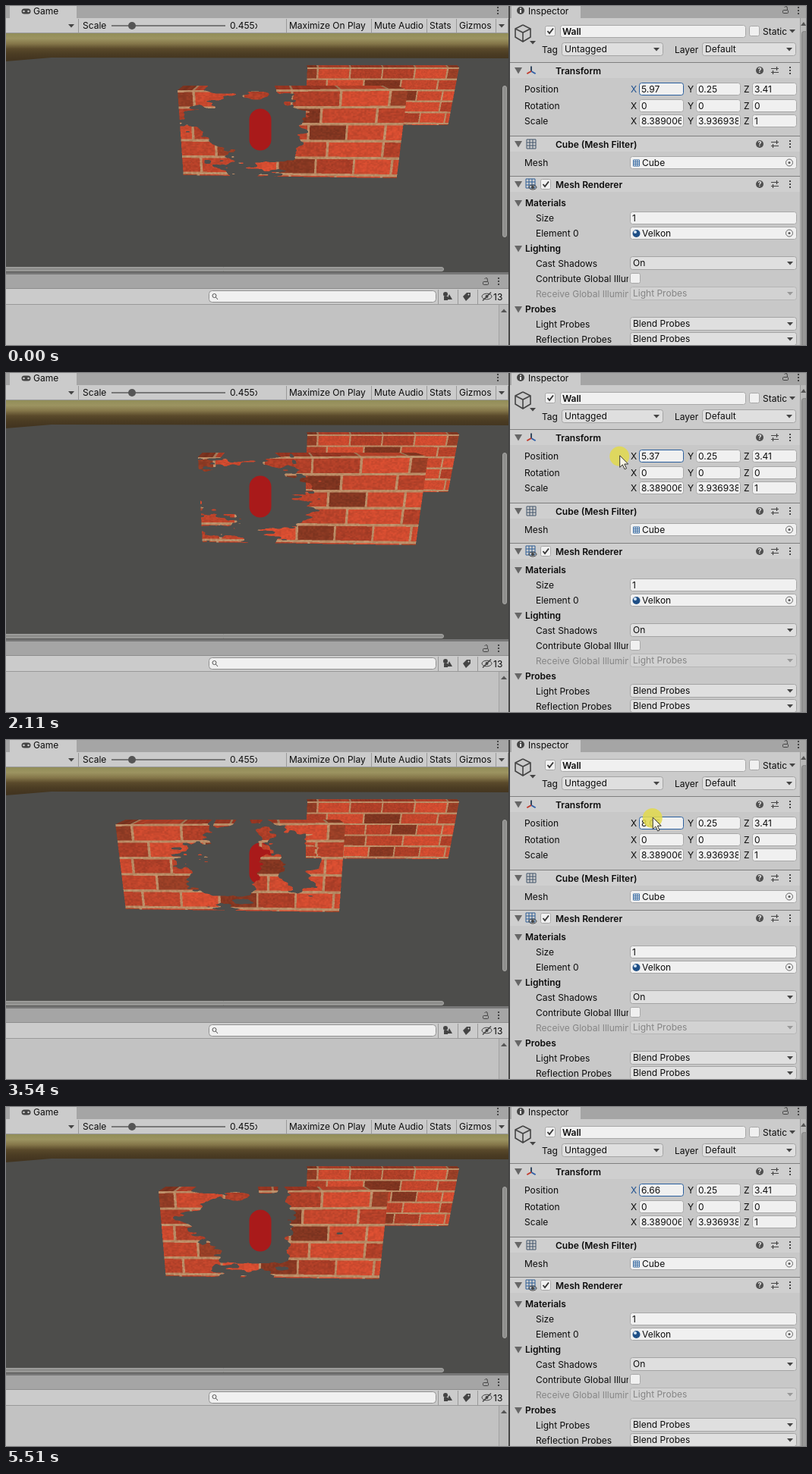
Animation, 1054 px wide and 447 px high, one loop 6050 ms. Source, as an HTML page with a canvas:

```html
<!DOCTYPE html>
<html lang="en">
<head>
<meta charset="utf-8">
<title>Wall cutout</title>
<style>
html, body { margin: 0; width: 100%; height: 100%; overflow: hidden; background: #c8c8c8; }
canvas { display: block; width: 1054px; height: 447px; }
</style>
</head>
<body>
<canvas id="stage" width="1054" height="447"></canvas>
<script>
const LOOP = 6050, START = 1630, STEP = 79.2;
const g = document.getElementById('stage').getContext('2d');
const FONT = 'Inter, Roboto, sans-serif';
const INK = '#0c0c0c', ICON = '#444';

const PRESS = 0, RELEASE = 41, GONE = 49;
const part = (n, a, b) => Math.min(1, Math.max(0, (n - a) / (b - a)));
const smooth = f => f * f * (3 - 2 * f);
const easeOut = f => 1 - (1 - f) ** 3;
const bezier = (f, a, b, c) => (1 - f) ** 2 * a + 2 * f * (1 - f) * b + f * f * c;

// Right, far left, then a quick release back to the middle
function wallX(n) {
  return 226 + 32 * smooth(part(n, 0, 8)) - 127 * smooth(part(n, 8, 28)) + 70 * easeOut(part(n, 31, 38));
}
function pointerAt(n) {
  if (n <= -11) {
    const f = part(n, -19, -13);
    return [bezier(f, 1002, 520, 781), bezier(f, 422, 120, 115)];
  }
  if (n <= PRESS) return [781 + 57 * part(n, -11, -7) - 16 * part(n, -5, -3), 115 - 5 * part(n, -11, -7)];
  if (n < RELEASE) return [829 + (201 - wallX(n)) * .4, 110 - 7 * smooth(part(n, 5, 17))];
  const f = part(n, 40, 48);
  return [bezier(f, 829, 1125, 989), bezier(f, 103, 180, 438)];
}

// ---- noise and brick texture ----
function hash(i, j) {
  let h = Math.imul(i, 374761393) + Math.imul(j, 668265263) | 0;
  h = Math.imul(h ^ (h >>> 13), 1274126177);
  return ((h ^ (h >>> 16)) >>> 0) / 4294967296;
}
function noise(x, y) {
  const i = Math.floor(x), j = Math.floor(y);
  const a = smooth(x - i), b = smooth(y - j);
  const top = hash(i, j) * (1 - a) + hash(i + 1, j) * a;
  const low = hash(i, j + 1) * (1 - a) + hash(i + 1, j + 1) * a;
  return top * (1 - b) + low * b;
}

const TW = 610, TH = 240, SPAN = 303, RISE = 116;
const COURSE = .192, FIRST = [21, 41, 17, 48, 26], PITCH = [65, 75, 52.5, 77, 53.6];
const tex = new Uint8ClampedArray(TW * TH * 3);
const field = new Float32Array(TW * TH);

function brick(p, v) {
  const row = (v - .205) / COURSE + 1, r = Math.floor(row), kind = r % 5;
  const col = (p - FIRST[kind]) / PITCH[kind] + 1, i = Math.floor(col);
  const edge = Math.abs(row - Math.round(row)) * COURSE * RISE;
  const side = Math.abs(col - Math.round(col)) * PITCH[kind];
  const grain = noise(p / 2.5, v * RISE / 1.8) - .5;
  if (edge < 1.6 || side < 1.7) return [186, 140, 102].map(c => c + grain * 24);
  const base = (i + 3 * r) % 5 ? [202, 73, 46] : [148, 61, 37];
  const tone = .84 + .22 * hash(i + 7, r + 3) + grain * .16;
  return base.map(c => c * tone);
}

// How strongly a place on the wall withstands the cutout
const clump = (p, v, cp, cv, wp, wv) => Math.exp(-(((p - cp) / wp) ** 2) - ((v - cv) / wv) ** 2);
function resist(p, v) {
  const q = v * RISE;
  const rough = noise(p / 24, q / 8) * .6 + noise(p / 9 + 50, q / 3) * .4 - .5;
  return rough * .8
    + 1.1 * clump(p, v, 203, .6, 23, .38)
    + .5 * clump(p, v, 45, .7, 32, .14)
    + .5 * clump(p, v, 106, .09, 15, .08)
    - .4 * clump(p, v, 241, .5, 18, .2)
    + .4 * clump(p, v, 165, .85, 80, .022);
}
for (let j = 0; j < TH; j++) for (let i = 0; i < TW; i++) {
  const p = (i + .5) / TW * SPAN, v = (j + .5) / TH, n = j * TW + i;
  tex.set(brick(p, v), n * 3);
  field[n] = resist(p, v);
}

// ---- walls ----
const VX = 335;
function drawWall(o) {
  const x0 = Math.floor(o.x) - 2, y0 = o.top - 1, w = o.w + 8, h = o.bl + 6 - y0;
  const c = document.createElement('canvas');
  c.width = w; c.height = h;
  const cx = c.getContext('2d'), img = cx.createImageData(w, h), d = img.data;
  for (let j = 0; j < h; j++) for (let i = 0; i < w; i++) {
    let r = 0, gr = 0, b = 0, n = 0;
    for (let s = 0; s < 4; s++) {
      const x = x0 + i + .25 + (s & 1) * .5, y = y0 + j + .25 + (s >> 1) * .5;
      if (y < o.top) continue;
      const rise = (y - o.tl) / (o.bl - o.tl);
      const k = rise < 0 ? 1 - o.kt * (o.tl - y) / (o.tl - o.top) : 1 - o.k * rise;
      const u = (VX + (x - VX) / k - o.x) / o.w;
      if (u < 0 || u >= 1) continue;
      const yt = o.tl + u * (o.tr - o.tl), yb = o.bl + u * (o.br - o.bl);
      const v = (y - yt) / (yb - yt);
      if (v >= 1) continue;
      const col = Math.floor(u * TW);
      if (o.cut) {
        const f = field[Math.floor(Math.max(v, 0) * TH) * TW + col];
        if (Math.hypot((x - 320) / 80, (y - 163) / 59) + f < 1) continue;
      }
      const lit = v < 0 ? .84 : 1;
      const m = (Math.floor((v < 0 ? .1 : v) * TH) * TW + col) * 3;
      r += tex[m] * lit; gr += tex[m + 1] * lit; b += tex[m + 2] * lit; n++;
    }
    if (n) {
      const m = (j * w + i) * 4;
      d[m] = r / n; d[m + 1] = gr / n; d[m + 2] = b / n; d[m + 3] = n * 63.75;
    }
  }
  cx.putImageData(img, 0, 0);
  return { c, x: x0, y: y0 };
}
const backWall = drawWall({ x: 397, w: 200, tl: 81, tr: 81, bl: 156, br: 157, top: 78, k: .055, kt: .01 });
let front = null, frontX = -1;
function frontWall(x) {
  if (x !== frontX) {
    front = drawWall({ x, w: SPAN, tl: 111, tr: 109, bl: 223, br: 227, top: 105, k: .071, kt: .07, cut: true });
    frontX = x;
  }
  return front;
}

// ---- small drawing helpers ----
function rect(x, y, w, h, fill) { g.fillStyle = fill; g.fillRect(x, y, w, h); }
function box(x, y, w, h, fill, line, r = 3) {
  g.beginPath();
  g.roundRect(x + .5, y + .5, w - 1, h - 1, r);
  g.fillStyle = fill; g.fill();
  if (line) { g.strokeStyle = line; g.lineWidth = 1; g.stroke(); }
}
function text(s, x, y, o = {}) {
  g.save();
  if (o.clip) { g.beginPath(); g.rect(x - 2, y - 14, o.clip - x + 2, 20); g.clip(); }
  g.font = (o.bold ? '600 ' : '') + '12px ' + FONT;
  g.fillStyle = o.fill || INK;
  g.fillText(s, x, y);
  g.restore();
}
function shape(pts, fill) {
  g.beginPath();
  for (let i = 0; i < pts.length; i += 2) g.lineTo(pts[i], pts[i + 1]);
  g.closePath();
  g.fillStyle = fill; g.fill();
}
function lines(color, width, ...paths) {
  g.strokeStyle = color; g.lineWidth = width;
  g.beginPath();
  for (const p of paths) {
    g.moveTo(p[0], p[1]);
    for (let i = 2; i < p.length; i += 2) g.lineTo(p[i], p[i + 1]);
  }
  g.stroke();
}
function disc(x, y, r, fill) { g.beginPath(); g.arc(x, y, r, 0, 7); g.fillStyle = fill; g.fill(); }
function ring(x, y, rx, ry, color) {
  g.beginPath(); g.ellipse(x, y, rx, ry, 0, 0, 7);
  g.strokeStyle = color; g.lineWidth = 1; g.stroke();
}
function down(x, y, fill = ICON) { shape([x - 4, y - 2, x + 4, y - 2, x, y + 2.5], fill); }
function dots(x, y) { for (const k of [-4, 0, 4]) rect(x - 1, y + k - 1, 2, 2, ICON); }
function lock(x, y) {
  box(x - 4, y, 8, 5, '#a5a5a5', ICON, 1);
  lines(ICON, 1, [x - 1.5, y - 3, x, y - 4.5, x + 2, y - 4, x + 2.5, y]);
}
function check(x, y, on) {
  box(x - 7, y - 7, 14, 14, '#f0f0f0', '#a8a8a8', 2);
  if (on) lines('#333', 1.8, [x - 3.5, y, x - 1, y + 3, x + 4, y - 3.5]);
}
function input(x, y, w, s, o = {}) {
  box(x, y, w, 17, '#f0f0f0', o.line || '#a8a8a8');
  text(s, x + (o.pad || 3), y + 13, { clip: x + w - 3, bold: o.bold });
}
function menu(x, y, w, s, off) {
  box(x, y, w, 18, off ? '#d2d2d2' : '#dfdfdf', off ? '#b6b6b6' : '#a4a4a4');
  text(s, x + 4, y + 13, { fill: off ? '#858585' : INK });
  down(x + w - 9, y + 9, off ? '#999' : ICON);
}
function picker(y, s) {
  input(822, y, 220, s, { pad: 16 });
  ring(1032, y + 8.5, 4.5, 4.5, '#666');
  disc(1032, y + 8.5, 1.5, '#555');
}
function grid(x, y, r, color) {
  for (let k = -1; k <= 1; k += 2 / 3)
    lines(color, 1, [x - r, y + k * r, x + r, y + k * r], [x + k * r, y - r, x + k * r, y + r]);
}
function eye(x, y, rx, ry) { ring(x, y, rx, ry, ICON); disc(x, y, 2, ICON); }
function fold(y) { shape([670, y - 4, 680, y - 4, 675, y + 4.5], '#666'); }
function header(y, s) {
  rect(664, y - 11, 382, 21, '#cfcfcf');
  rect(664, y - 11, 382, 1, '#7f7f7f');
  fold(y);
  text(s, 724, y + 5, { bold: true });
  disc(993, y, 5, '#505050');
  g.font = 'bold 9px ' + FONT; g.fillStyle = '#eee'; g.fillText('?', 990.4, y + 3.2);
  for (const k of [-2.5, 2.5])
    lines(ICON, 1.2, [1008, y + k, 1018, y + k], [1013 - k, y + k - 2.5, 1013 - k, y + k + 2.5]);
  dots(1033, y);
}

// ---- panels ----
function scene(x) {
  rect(0, 36, 662, 316, '#4d4d4b');
  const sky = g.createLinearGradient(0, 36, 0, 70);
  ['#918d58', '#9c9461', '#85774a', '#5a4a2b', '#4b3c23', '#433520'].forEach((c, i) => sky.addColorStop(i / 5, c));
  shape([0, 36, 662, 36, 662, 69, 60, 68, 0, 73], sky);
  g.drawImage(backWall.c, backWall.x, backWall.y);
  box(320, 135, 30, 56, '#a91a1a', null, 15);
  const f = frontWall(x);
  g.drawImage(f.c, f.x, f.y);
  box(654, 105, 6, 200, '#8f8f8d', '#a6a6a4');
  box(-6, 344, 583, 6, '#8f8f8d', '#a6a6a4');
}

function gamePanel() {
  rect(0, 0, 662, 16, '#a5a5a5');
  rect(5, 0, 88, 16, '#cbcbcb');
  rect(0, 16, 662, 20, '#cbcbcb');
  rect(0, 35, 662, 1, '#999');
  box(20, 3, 13, 8, ICON, null, 4);
  for (const x of [23.5, 29.5]) disc(x, 7, 1.3, '#ccc');
  text('Game', 36, 11);
  dots(648, 6);
  down(86, 26);
  text('Scale', 101, 30);
  rect(139, 25, 150, 2, '#777');
  disc(166, 26, 5, '#555');
  text('0.455x', 295, 30, { clip: 331 });
  const tools = { 'Maximize On Play': 373, 'Mute Audio': 485, 'Stats': 558, 'Gizmos': 597 };
  for (const s in tools) {
    rect(tools[s] - 4, 17, 1, 18, '#999');
    text(s, tools[s], 30);
  }
  for (const x of [95, 645, 661]) rect(x, 17, 1, 18, '#999');
  down(653, 26);
}

function lowerPanel() {
  rect(0, 351, 662, 3, '#777');
  rect(0, 354, 662, 19, '#a5a5a5');
  lock(632, 363); dots(649, 363);
  rect(0, 372, 662, 1, '#8c8c8c');
  rect(0, 373, 662, 20, '#cbcbcb');
  rect(0, 393, 662, 1, '#999');
  rect(0, 394, 662, 53, '#c2c2c2');
  box(267, 375, 300, 16, '#f0f0f0', '#909090', 4);
  ring(274.5, 382, 2.5, 2.5, '#555'); lines('#555', 1, [276.5, 384, 279, 387]);
  for (const x of [569, 595, 621]) rect(x, 374, 1, 19, '#999');
  disc(579, 380, 3, ICON); rect(577, 383, 5, 5, ICON); shape([584, 380, 588, 387, 581, 387], ICON);
  shape([602, 383, 607, 378, 612, 378, 612, 383, 606, 389], ICON); disc(609.5, 380.5, 1, '#ddd');
  eye(633.5, 383, 6.5, 3.8); lines(ICON, 1.4, [628, 388.5, 639, 377.5]);
  text('13', 642, 388);
  rect(649, 394, 13, 53, '#bababa'); rect(649, 394, 1, 53, '#a2a2a2');
  shape([652, 404, 660, 404, 656, 399.5], '#555');
}

function cubeIcon(x, y) {
  lines(ICON, 1.6, [x, y - 11, x + 10, y - 6, x + 10, y + 5, x, y + 11, x - 10, y + 5, x - 10, y - 6, x, y - 11],
    [x - 10, y - 6, x, y - 1, x + 10, y - 6], [x, y - 1, x, y + 11]);
}

const PROPS = [['fold', 'Materials'], ['input', 'Size', '1'], ['pick', 'Element 0', 'Velkon'],
  ['fold', 'Lighting'], ['menu', 'Cast Shadows', 'On'], ['check', 'Contribute Global Illumination'],
  ['off', 'Receive Global Illumination', 'Light Probes'],
  ['fold', 'Probes'], ['menu', 'Light Probes', 'Blend Probes'], ['menu', 'Reflection Probes', 'Blend Probes']];

function property([kind, label, value], i) {
  const y = 260 + 20 * i;
  if (kind === 'fold') {
    fold(y);
    text(label, 684, y + 4, { bold: true });
    return;
  }
  text(label, 698, y + 4, { clip: 820, fill: kind === 'off' ? '#858585' : INK });
  if (kind === 'input') input(822, y - 9, 220, value);
  if (kind === 'check') check(829, y - 1, false);
  if (kind === 'menu' || kind === 'off') menu(822, y - 10, 220, value, kind === 'off');
  if (kind === 'pick') {
    picker(y - 9, value);
    disc(830.5, y, 5, '#1f4f86'); disc(829, y - 2, 2, '#d5e5f5');
  }
}

function inspector(value, dragging) {
  rect(662, 0, 2, 447, '#444');
  rect(664, 0, 390, 16, '#a5a5a5');
  rect(666, 0, 91, 16, '#cbcbcb');
  rect(664, 16, 390, 431, '#c8c8c8');
  disc(678, 6, 5, ICON); rect(677, 5, 2, 4, '#ddd'); rect(677, 2.5, 2, 1.5, '#ddd');
  text('Inspector', 688, 11);
  lock(1027, 5); dots(1044, 6);

  rect(664, 16, 382, 59, '#cbcbcb');
  cubeIcon(681, 36);
  down(694, 48);
  check(717, 33, true);
  input(730, 25, 245, 'Wall', { bold: true });
  check(986, 33, false);
  text('Static', 997, 38); down(1036, 33);
  text('Tag', 706, 62); menu(732, 48, 134, 'Untagged');
  text('Layer', 881, 62); menu(917, 48, 124, 'Default');

  header(85, 'Transform');
  ['#33475e', '#2f5fa8', '#c23a2c'].forEach((c, i) => {
    const a = (i / 3 - .25) * 2 * Math.PI;
    lines(c, 2, [692, 86, 692 + 6.5 * Math.cos(a), 86 + 6.5 * Math.sin(a)]);
  });
  const rows = [['Position', 101, value, '0.25', '3.41'], ['Rotation', 123, '0', '0', '0'], ['Scale', 143, '8.389006', '3.936938', '1']];
  rows.forEach(([name, y, ...vals], r) => {
    text(name, 683, y + 13);
    vals.forEach((s, i) => {
      const x = 834 + 74.5 * i, active = r + i === 0;
      text('XYZ'[i], Math.round(x) - 11, y + 13, { fill: active && !dragging ? '#1d4f8f' : INK });
      input(Math.round(x), y, 59, s, { line: active ? '#2a5f9e' : null });
    });
  });

  header(182, 'Cube (Mesh Filter)');
  grid(692, 182, 6, '#41556b');
  text('Mesh', 683, 211); picker(198, 'Cube'); grid(830.5, 207, 4, '#3b6ea5');

  header(235, 'Mesh Renderer');
  grid(691, 234, 6, '#2f5f96');
  eye(694, 239, 5, 3);
  check(711, 235, true);
  PROPS.forEach(property);

  rect(1046, 16, 8, 431, '#b8b8b8'); rect(1046, 16, 1, 431, '#999');
  shape([1047, 26, 1054, 26, 1051, 21], '#555');
  box(1048, 33, 8, 430, '#979797', '#808080');
}

function pointer(n) {
  const [x, y] = pointerAt(n);
  if (n >= PRESS && n < RELEASE) disc(x, y, 13, n < 1 ? 'rgba(208,216,56,.85)' : 'rgba(226,218,78,.86)');
  if (n < 1 && x > 815 && x < 834) {
    for (const k of [-1, 1]) {
      shape([x + 8 * k, y, x + 3 * k, y - 5, x + 3 * k, y + 5], '#f2f2d8');
      lines('#6f7a30', 1, [x + 3 * k, y - 5, x + 8 * k, y, x + 3 * k, y + 5]);
    }
    return;
  }
  const a = x + .5, b = y - 1;
  shape([a, b, a, b + 15.5, a + 3.6, b + 12, a + 6.4, b + 18, a + 8.8, b + 17, a + 6.1, b + 11.2, a + 11, b + 11.2], '#f7f4e4');
  g.strokeStyle = '#333'; g.lineWidth = 1; g.stroke();
}

let shown = null;
function frame(now) {
  const t = now % LOOP;
  const n = Math.floor((t - START) / STEP + .1);
  const cursor = t >= 170 && n < GONE;
  const key = n + ':' + cursor;
  if (key !== shown) {
    shown = key;
    // The number lags one step behind the wall
    const value = (5.97 + (226 - wallX(n - 1)) / 36.2).toFixed(2);
    scene(wallX(n));
    gamePanel();
    lowerPanel();
    inspector(value, n >= PRESS && n < RELEASE);
    if (cursor) pointer(n);
  }
  requestAnimationFrame(frame);
}
requestAnimationFrame(frame);
</script>
</body>
</html>
```
